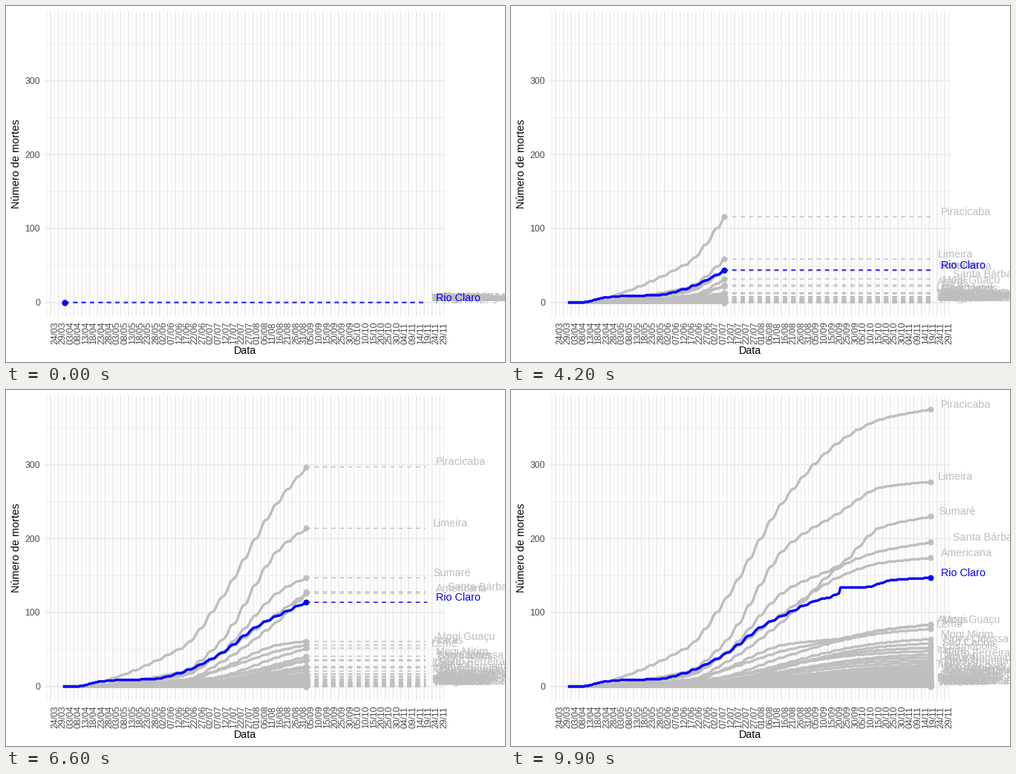
These frames come from a looping animation (672x480 px, 10 s). A matplotlib script:

```python
import numpy as np
import matplotlib.pyplot as plt
from matplotlib.animation import FuncAnimation
from matplotlib.collections import LineCollection

W, H, DPI = 672, 480, 96
PX = 72 / DPI  # points per pixel
LEFT, RIGHT, TOP, BOTTOM = 52.4, 592, 7, 418.7
GREY, BLUE, GRID, TICK = "#bebebe", "#0000ff", "#ebebeb", "#4d4d4d"
FRAMES, LAST = 100, 232

plt.rcParams["font.family"] = "Liberation Sans"
rng = np.random.default_rng(7)


def px(day):
    return 79.02 + 2.0963 * np.asarray(day)


def py(deaths):
    return 399.9 - 0.9975 * np.asarray(deaths)


# Cumulative deaths: smooth growth, with fewer reports at weekends
DAYS = np.arange(-1, LAST + 1)
REPORT = np.clip(DAYS + 0.8 * np.sin(2 * np.pi * DAYS / 7), 0, LAST)
KEYS = (0, 75, 99, 139, 174, 200, LAST)


def through(values, keys=KEYS):
    """Monotone cubic through a few points, in whole numbers."""
    k, v = np.array(keys, float), np.array(values, float)
    h = np.diff(k)
    s = np.diff(v) / h
    mean = 2 * s[:-1] * s[1:] / np.maximum(s[:-1] + s[1:], 1e-9)
    m = np.concatenate([[0], mean, [s[-1]]])
    i = np.clip(np.searchsorted(k, REPORT, side="right") - 1, 0, len(h) - 1)
    t = (REPORT - k[i]) / h[i]
    ease = t * t * (3 - 2 * t)
    bend = t * (1 - t) * h[i] * (m[i] * (1 - t) - m[i + 1] * t)
    return np.rint(v[i] + (v[i + 1] - v[i]) * ease + bend)


def logistic(total, mid, width):
    def grow(d):
        return 1 / (1 + np.exp((mid - d) / width))
    return np.rint(total * grow(REPORT) / grow(LAST))


cities = {
    "Piracicaba": through([0, 52, 114, 255, 332, 361, 375]),
    "Limeira": through([0, 20, 58, 188, 236, 269, 277]),
    "Sumaré": through([0, 16, 43, 130, 165, 215, 230]),
    "Santa Bárbara d'Oeste": through([0, 7, 31, 92, 162, 183, 195]),
    "Americana": through([0, 14, 42, 102, 149, 167, 174]),
    "Mogi Guaçu": through([0, 5, 23, 57, 65, 76, 84]),
    "Araras": through([0, 9, 22, 49, 64, 76, 84]),
    "Leme": through([0, 5, 13, 41, 62, 72, 78]),
}

# Smaller towns, from most to fewest deaths
TOWNS = """Mogi Mirim, Nova Odessa, São Carlos, Cosmópolis, Itapira,
Porto Ferreira, Capivari, Artur Nogueira, Pirassununga, Conchal, Tietê,
Cordeirópolis, Rio das Pedras, São Pedro, Santa Gertrudes, Iracemápolis,
Laranjal Paulista, Cerquilho, Descalvado, Engenheiro Coelho, Elias Fausto,
Charqueada, Itirapina, Brotas, Rafard, Estiva Gerbi, Torrinha, Saltinho,
Ipeúna, Águas de São Pedro, Santa Maria da Serra, Holambra,
Santa Cruz da Conceição, Analândia, Corumbataí, Mombuca, Jumirim"""
for rank, town in enumerate(TOWNS.replace("\n", " ").split(", ")):
    cities[town] = logistic(66 * 0.91 ** rank - 2, rng.uniform(130, 150),
                            rng.uniform(24, 30))

rio = through([0, 0, 7, 9, 10, 19, 43, 82, 98, 116, 125, 134, 134, 144, 147],
              [0, 7, 23, 37, 56, 75, 99, 124, 139, 158, 172, 173, 188, 208, LAST])

# Static stage
fig = plt.figure(figsize=(W / DPI, H / DPI), dpi=DPI, facecolor="white")
ax = fig.add_axes([0, 0, 1, 1])
ax.set_xlim(0, W)
ax.set_ylim(H, 0)
ax.axis("off")


def write(x, y, s, size, color, **kw):
    return ax.text(x, y, s, fontsize=size * PX, color=color, va="baseline",
                   rotation_mode="anchor", **kw)


def rule(x, y, width):
    ax.plot(x, y, color=GRID, lw=width * PX, snap=False, zorder=1,
            solid_capstyle="butt")


MAJOR, MINOR = 1.81, 0.9
for v in range(50, 400, 100):
    rule([LEFT, RIGHT], [py(v)] * 2, MINOR)
for k in range(52):
    rule([px(5 * k - 11.5)] * 2, [TOP, BOTTOM], MINOR)
for v in range(0, 400, 100):
    rule([LEFT, RIGHT], [py(v)] * 2, MAJOR)
    write(46.1, py(v) + 4.3, str(v), 12.2, TICK, ha="right")
for k in range(51):
    x = px(5 * k - 9)
    rule([x, x], [TOP, BOTTOM], MAJOR)
    date = str(np.datetime64("2020-03-24") + 5 * k)
    write(x + 8.9, 441, f"{date[8:]}/{date[5:7]}", 12.2, TICK,
          ha="center", rotation=90)
write(322.2, 469, "Data", 14.3, "black", ha="center")
write(18, 212.8, "Número de mortes", 14.5, "black", ha="center", rotation=90)


# Moving parts
class Layer:
    """Lines, dashed leaders, dots and labels of one colour."""

    def __init__(self, data, color, end, z):
        self.series = list(data.values())
        self.end = px(end)
        self.paths = LineCollection([], colors=color, linewidths=3.4 * PX,
                                    capstyle="butt", joinstyle="round", zorder=z)
        self.leads = LineCollection([], colors=color, linewidths=1.42 * PX,
                                    linestyles=[(0, (4, 4))], capstyle="butt",
                                    zorder=z + 1)
        for c in (self.paths, self.leads):
            c.set_snap(False)
            ax.add_collection(c, autolim=False)
        self.dots, = ax.plot([], [], "o", color=color, ms=8 * PX, mew=0,
                             zorder=z + 2)
        self.labels = [write(0, 0, name, 14.4, color, zorder=z + 3)
                       for name in data]
        # each label is pushed right by a fifth of its own width
        renderer = fig.canvas.get_renderer()
        for label in self.labels:
            width = label.get_window_extent(renderer).width
            label.set_x(self.end + 0.2 * width)

    def show(self, day):
        n = day + 2
        xs, x = px(DAYS[:n]), px(day)
        ys = [py(s[n - 1]) for s in self.series]
        self.paths.set_segments([np.column_stack([xs, py(s[:n])])
                                 for s in self.series])
        self.leads.set_segments([[(x, y), (self.end, y)] for y in ys])
        self.dots.set_data([x] * len(ys), ys)
        for label, y in zip(self.labels, ys):
            label.set_y(y - 2.2)


layers = [Layer(cities, GREY, LAST, 2),
          Layer({"Rio Claro": rio}, BLUE, LAST + 1, 6)]


def draw(i):
    day = min(LAST, int(2.352 * i + 0.24))
    for layer in layers:
        layer.show(day)
    return []


anim = FuncAnimation(fig, draw, frames=FRAMES, interval=100, repeat=True,
                     blit=False)
plt.show()
```
